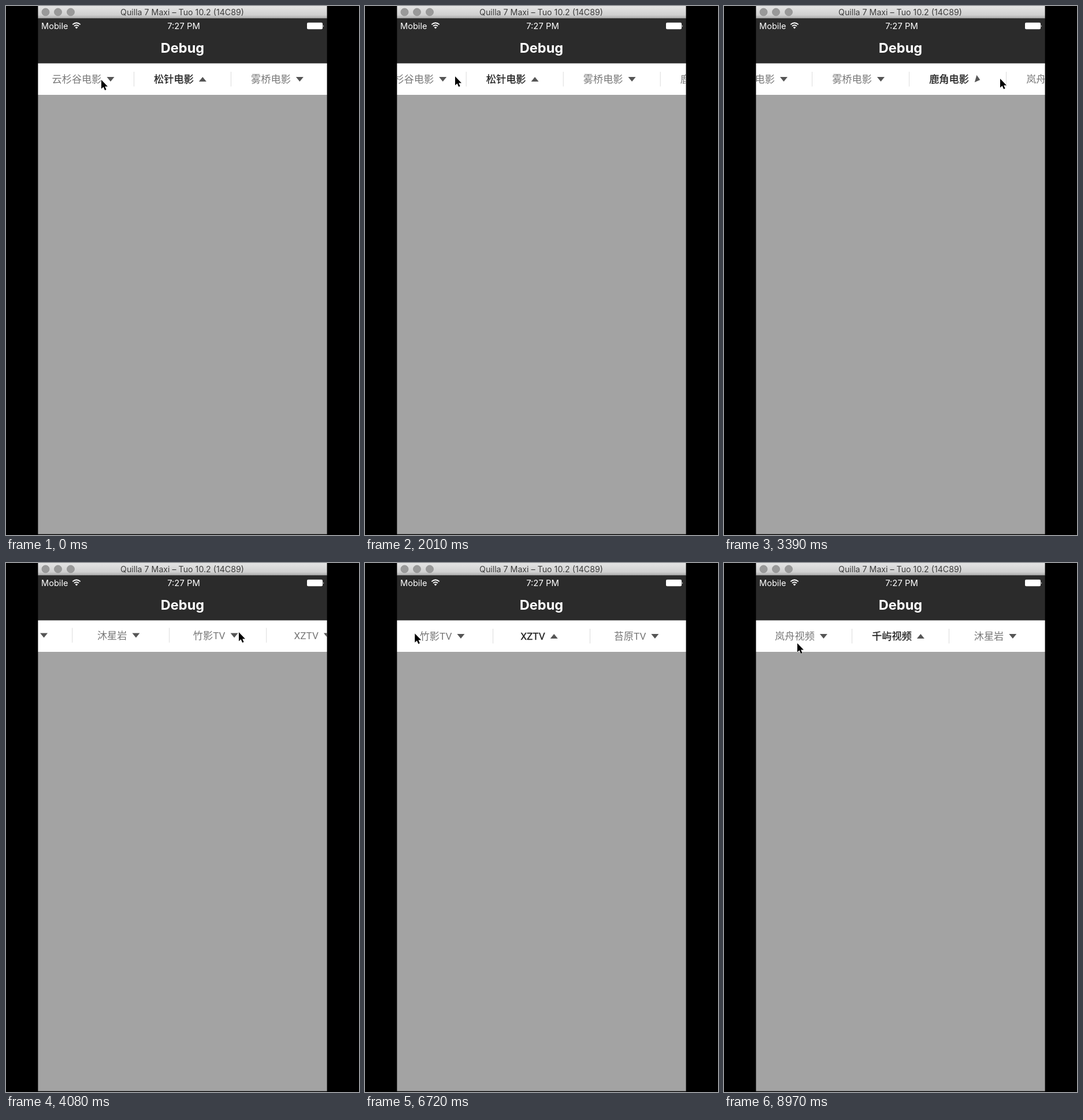
An HTML page for the animation above (9000 ms loop, 611 by 917 pixels).

```html
<!DOCTYPE html>
<html lang="zh">
<head>
<meta charset="utf-8">
<title>Scrolling tabs</title>
<style>
  html, body { margin: 0; width: 100%; height: 100%; overflow: hidden; background: #000; }
  svg { display: block; font-family: Inter, "Open Sans", sans-serif; }
  #tabs { font: 17.2px Roboto, "Noto Sans CJK SC", "Noto Sans CJK", sans-serif; text-anchor: middle; }
  #tabs text { fill: #777; }
  #tabs text.on { fill: #222; stroke: #222; stroke-width: .3px; }
  #tabs path { fill: #555; }
</style>
</head>
<body>
<svg width="611" height="917" viewBox="0 0 611 917">
  <defs>
    <linearGradient id="bar" x2="0" y2="1">
      <stop stop-color="#e4e4e4"/>
      <stop offset=".72" stop-color="#d0d0d0"/>
      <stop offset="1" stop-color="#a8a8a8"/>
    </linearGradient>
    <clipPath id="strip"><rect x="55.4" y="99" width="500.2" height="55"/></clipPath>
  </defs>
  <rect width="611" height="917"/>
  <rect x="55.4" width="500.2" height="21.6" fill="url(#bar)"/>
  <g fill="#999" stroke="#888" stroke-width=".7">
    <circle cx="68.5" cy="10.5" r="6.5"/>
    <circle cx="90" cy="10.5" r="6.5"/>
    <circle cx="112" cy="10.5" r="6.5"/>
  </g>
  <text x="305" y="15.5" font-size="14.2" fill="#3c3c3c" text-anchor="middle">Quilla 7 Maxi – Tuo 10.2 (14C89)</text>

  <rect x="55.4" y="21.6" width="500.2" height="78" fill="#2b2b2b"/>
  <g fill="#fff">
    <text x="61" y="39.5" font-size="14.6">Mobile</text>
    <text x="307.5" y="39.5" font-size="14.8" text-anchor="middle">7:27 PM</text>
    <text x="305.5" y="80.5" font-size="23.5" font-weight="700" text-anchor="middle">Debug</text>
    <rect x="521" y="28.8" width="27" height="11.4" rx="2"/>
    <path d="M548.8 32.5q1.8 2 0 4z"/>
    <path d="M119.6 37L122 39.5L124.4 37Q122 35 119.6 37"/>
  </g>
  <path d="M117.9 34.9Q122 31.4 126.1 34.9M115.3 32.1Q122 26.4 128.7 32.1" fill="none" stroke="#fff" stroke-width="1.9"/>

  <rect x="55.4" y="154" width="500.2" height="761.6" fill="#a3a3a3"/>
  <rect x="55.4" y="99.4" width="500.2" height="54.6" fill="#fff"/>
  <g clip-path="url(#strip)"><g id="tabs"></g></g>
  <path id="cursor" d="M0 0V15.6L3.6 12.3L6.1 18L8.6 16.9L6.2 11.4H11Z" stroke="#fff" paint-order="stroke"/>
</svg>
<script>
const LOOP = 9000, PITCH = 168, TAP_TIME = 200;
const names = ['云杉谷电影', '松针电影', '雾桥电影', '鹿角电影', '岚舟视频',
  '千屿视频', '沐星岩', '竹影TV', 'XZTV', '苔原TV'];

const smooth = u => u * u * (3 - 2 * u);
const slowDown = u => 1 - (1 - u) ** 3;
const progress = (t, start, duration) => Math.min(1, Math.max(0, (t - start) / duration));

// A tap selects a tab, turns its arrow and scrolls it to the middle.
const taps = [[-TAP_TIME, 1], [3303, 3], [5590, 8], [8550, 5]]
  .map(([start, tab]) => ({ start, tab, duration: TAP_TIME, to: (tab - 1) * PITCH }));
const flick = { start: 3640, duration: 1255, to: 7 * PITCH, ease: slowDown };
const drags = [
  { start: 1100, duration: 460, to: PITCH / 4 },
  { start: 1950, duration: 550, to: PITCH },
  flick,
  { start: 7000, duration: 1445, to: 5 * PITCH },
];
const moves = [...taps, ...drags].sort((a, b) => a.start - b.start);

// Resting points of the pointer: time, x, y.
const stops = [[0, 165, 128], [900, 202, 124], [2010, 156, 122], [3200, 478, 126], [3640, 478, 126],
  [4080, 403, 120], [5250, 352, 124], [5850, 352, 124], [6900, 64, 122], [7440, 138, 120],
  [8500, 114, 139], [LOOP, 127, 139]];

function scrollAt(t) {
  return moves.reduce((x, { start, duration, to, ease = smooth }) =>
    x + (to - x) * ease(progress(t, start, duration)), 0);
}

function pointerAt(t) {
  const n = stops.findIndex(stop => stop[0] > t);
  const [from, to] = [stops[n - 1], stops[n]];
  const u = smooth(progress(t, from[0], to[0] - from[0]));
  return [1, 2].map(k => from[k] + (to[k] - from[k]) * u);
}

const strip = document.getElementById('tabs');
const cursor = document.getElementById('cursor');

function add(tag, attributes) {
  const node = document.createElementNS('http://www.w3.org/2000/svg', tag);
  for (const key in attributes) node.setAttribute(key, attributes[key]);
  return strip.appendChild(node);
}

const tabs = names.map((name, i) => {
  const center = 138 + PITCH * i;
  const label = add('text', { x: center - 15.5, y: 133.3 });
  label.textContent = name;
  const arrowX = center + label.getComputedTextLength() / 2;
  const arrow = add('path', { d: 'M-6.5-4H6.5L0 4Z' });
  if (i < names.length - 1) {
    add('rect', { x: center + 83, y: 114, width: 1, height: 25.5, fill: '#dcdcdc' });
  }
  return { label, arrow, arrowX };
});

function draw() {
  const t = performance.now() % LOOP;
  // The strip drifts up a little while it is flicked.
  const lift = -1.5 * Math.sin(Math.PI * progress(t, flick.start, 900));
  strip.setAttribute('transform', `translate(${-scrollAt(t)} ${lift})`);
  cursor.setAttribute('transform', `translate(${pointerAt(t)})`);

  const { start, tab } = taps.findLast(tap => tap.start <= t);
  const turn = -180 * smooth(progress(t, start, TAP_TIME));
  tabs.forEach(({ label, arrow, arrowX }, i) => {
    label.classList.toggle('on', i === tab);
    arrow.setAttribute('transform', `translate(${arrowX} 127) rotate(${i === tab ? turn : 0})`);
  });
  requestAnimationFrame(draw);
}
draw();
</script>
</body>
</html>
```
